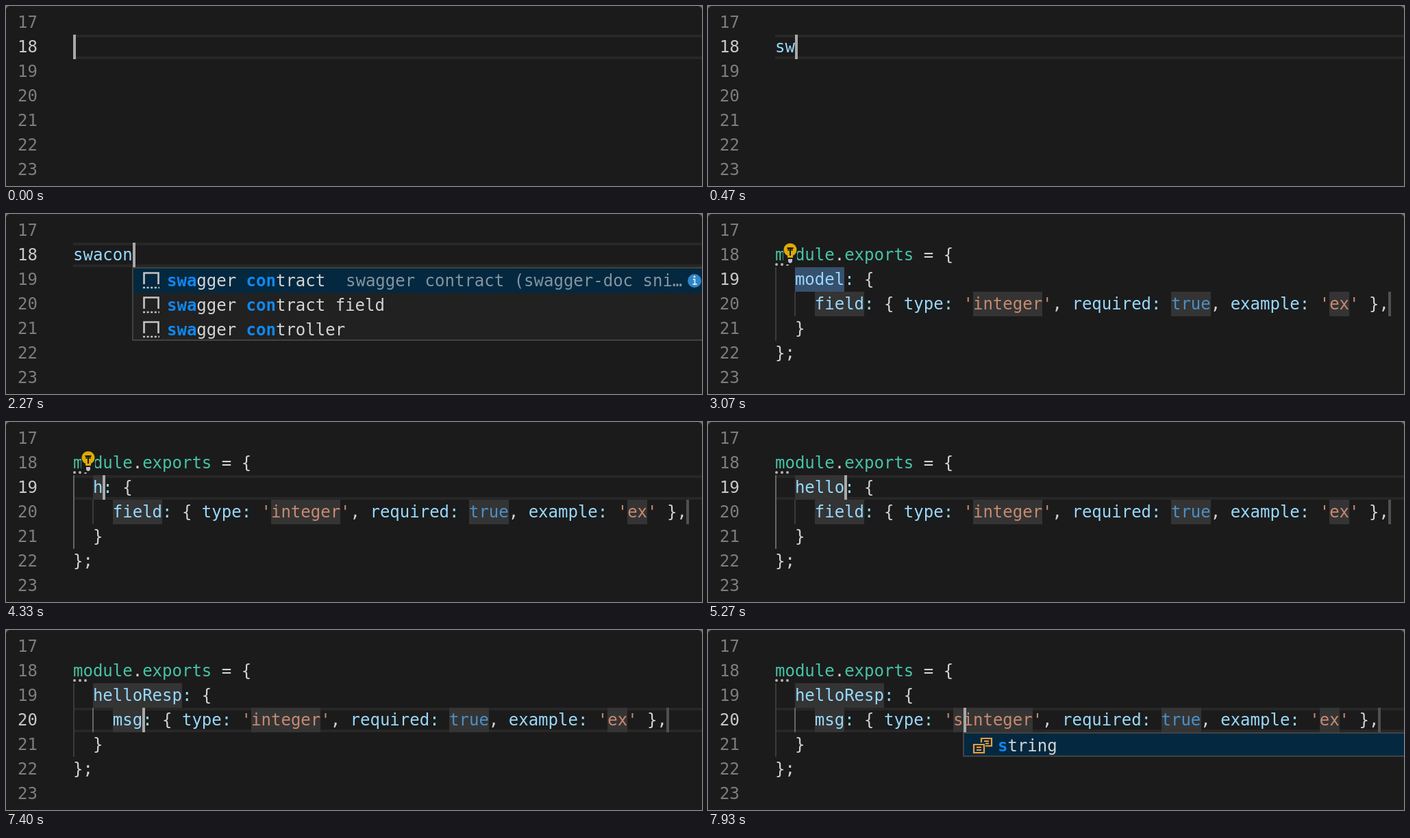
Write an HTML page that moves like this. It is 1016 px wide and 264 px high and loops after 8 s.

```html
<!DOCTYPE html>
<html lang="en">
<head>
<meta charset="utf-8">
<title>Snippet completion</title>
<style>
  html, body { margin: 0; width: 100%; height: 100%; overflow: hidden; background: #1b1b1b; }
  svg { display: block; width: 1016px; height: 264px; }
  text { font: 24px "DejaVu Sans Mono", monospace; white-space: pre; }
  .match { font-weight: bold; fill: #0f87f0; }
</style>
</head>
<body>
<svg id="stage" viewBox="0 0 1016 264"></svg>
<script>
const LOOP = 8000, LEFT = 98, CHAR = 14.449, LINE = 36, FIRST = 17;
const C = {
  bg: '#1b1b1b', text: '#d4d4d4', key: '#98d9fd', type: '#47c3a6', str: '#c8896f', bool: '#4b90c8',
  dim: '#7d7d7d', bright: '#c8c8c8', mark: '#343434', select: '#36506e', caret: '#a8a8a8',
  border: '#272727', guide: '#3b3b3b', activeGuide: '#666', popup: '#212121', popupEdge: '#424242',
  row: '#04283f', icon: '#c5c5c5'
};

// Keystrokes, in ms
const PREFIX = [270, 470, 600, 1870, 2070, 2200];
const MODEL = [4330, 4470, 4600, 4670, 5030, 5530, 5630, 5870, 6070];
const FIELD = [7000, 7130, 7270];
const EXPAND = 2530, TO_FIELD = 6400, TO_TYPE = 7530, TYPE_S = 7870;
const KEYS = [-370, ...PREFIX, EXPAND, ...MODEL, TO_FIELD, ...FIELD, TO_TYPE, TYPE_S];

const SNIPPETS = ['swagger contract', 'swagger contract field', 'swagger controller', 'swagger doc', 'ShadowRoot'];
const CHOICES = ['integer', 'string', 'boolean', 'number'];

const typed = (word, times, t) => word.slice(0, times.filter(k => k <= t).length);
const colX = col => LEFT + col * CHAR;
const rowY = row => 6 + (row - FIRST) * LINE;
const rect = (x, y, w, h, fill) => `<rect x="${x}" y="${y}" width="${w}" height="${h}" fill="${fill}"/>`;
const label = (x, y, content, fill) => `<text x="${x}" y="${y}" fill="${fill}">${content}</text>`;
const cell = (row, col, n, fill) => rect(Math.round(colX(col)), rowY(row), Math.round(n * CHAR), LINE, fill);
const caret = (row, col) => rect(Math.round(colX(col)), rowY(row), 4, LINE, C.caret);

// Each part is [text, colour, background]
function codeLine(row, col, parts) {
  let out = '';
  for (const [content, fill, back] of parts) {
    if (back) out += cell(row, col, content.length, back);
    out += label(colX(col), rowY(row) + 26, content, fill);
    col += content.length;
  }
  return { out, end: col };
}

function lineBorder(row) {
  const y = rowY(row);
  return rect(LEFT, y, 918, 4, C.border) + rect(LEFT, y + 32, 918, 4, C.border);
}

function bulb(row) {
  const y = rowY(row);
  return rect(110, y + 1, 20, 31, C.bg) +
    `<g transform="translate(120 ${y + 11})">
      <path d="M-4 11V8A9.5 9.5 0 1 1 4 8V11Z" fill="#dcaa08"/>
      <path d="M-4.5-3H4.5M0-3V8M-2.5-3V1M2.5-3V1" stroke="${C.bg}" stroke-width="2" fill="none"/>
      <path d="M-3 13H3V17L1 19H-1L-3 17Z" fill="#c0c0c0"/>
    </g>`;
}

const ICONS = {
  snippet: `<path d="M2.5 19V2.5H23.5V19" fill="none" stroke="${C.icon}" stroke-width="2.6"/>
    <path d="M1 24H25" stroke="${C.icon}" stroke-width="2.6" stroke-dasharray="3 2.6"/>`,
  variable: `<path d="M5 7H1V20H5M22 7H26V20H22" fill="none" stroke="${C.icon}" stroke-width="2.4"/>
    <path d="M6 12L15 7L21 10V15L12 20L6 17Z" fill="#75beff"/>
    <path d="M7 12L12.5 14.5L20.5 10.5" fill="none" stroke="${C.popup}" stroke-width="1.4"/>`,
  choice: `<g fill="${C.row}" stroke="#ee9d38" stroke-width="2.2">
    <path d="M12 9V3H27V14H18M1 12H16V24H1Z"/>
    <path d="M16 7H23M18 10.500H23M5 16H12M5 20H12"/></g>`
};

function highlight(word, prefix) {
  const hits = new Set(), lower = word.toLowerCase();
  let from = 0;
  for (const ch of prefix) {
    let i = lower.indexOf(ch, from);
    if (i < 0) i = lower.indexOf(ch);
    else from = i + 1;
    hits.add(i);
  }
  return [...word].map((ch, i) => hits.has(i) ? `<tspan class="match">${ch}</tspan>` : ch).join('');
}

function popup(row, col, items, prefix, iconOf, detail) {
  const x = Math.round(colX(col)), y = rowY(row + 1), h = items.length * LINE;
  let out = rect(x - 1, y, 860, h, C.popupEdge) + rect(x + 1, y + 2, 856, h - 4, C.popup) +
    rect(x + 1, y + 2, 856, Math.min(LINE, h - 4), C.row);
  items.forEach((item, i) => {
    const top = y + i * LINE;
    out += `<g transform="translate(${x + 14} ${top + 6})">${ICONS[iconOf(item)]}</g>` +
      label(x + 50, top + 28, highlight(item, prefix), C.text);
  });
  if (detail) {
    out += label(x + 311, y + 28, detail, '#8494a0') +
      `<circle cx="${x + 820}" cy="${y + 20}" r="10" fill="#2f86c6"/>` +
      `<path d="M${x + 818} ${y + 18}h2.500v7m-3 0h6" stroke="#d2e6f4" stroke-width="1.8" fill="none"/>` +
      `<circle cx="${x + 820}" cy="${y + 14}" r="1.600" fill="#d2e6f4"/>`;
  }
  return out;
}

function prefixScene(t, blink) {
  const word = typed('swacon', PREFIX, t), n = word.length;
  let out = lineBorder(18) + codeLine(18, 0, [[word, C.key]]).out;
  if (t >= 530) {
    // A longer list runs past the bottom edge until the fourth letter
    const items = n < 4 ? [...SNIPPETS, ' '] : SNIPPETS.slice(0, n < 5 ? 5 : 3);
    out += popup(18, n, items, word,
      item => item === 'ShadowRoot' ? 'variable' : 'snippet',
      'swagger contract (swagger-doc sni…');
  }
  return out + (blink ? caret(18, n) : '');
}

function codeScene(t, blink) {
  const inField = t >= TO_FIELD, inType = t >= TO_TYPE, hasS = t >= TYPE_S;
  const model = typed('helloResp', MODEL, t) || 'model';
  const field = typed('msg', FIELD, t) || 'field';
  const modelSelected = t < MODEL[0], fieldSelected = inField && t < FIELD[0];
  const type = (hasS ? 's' : '') + 'integer';
  const row = inField ? 20 : 19;
  let out = modelSelected || fieldSelected ? '' : lineBorder(row);

  out += codeLine(18, 0, [['module', C.type], ['.', C.text], ['exports', C.type], [' = {', C.text]]).out;
  out += codeLine(19, 2, [
    [model, C.key, modelSelected ? C.select : C.mark], [':', C.key], [' {', C.text]]).out;
  const body = codeLine(20, 4, [
    [field, C.key, fieldSelected ? C.select : C.mark], [':', C.key], [' { ', C.text],
    ['type:', C.key], [" '", C.str], [type, C.str, C.mark], ["'", C.str], [', ', C.text],
    ['required:', C.key], [' ', C.text], ['true', C.bool, C.mark], [', ', C.text],
    ['example:', C.key], [" '", C.str], ['ex', C.str, C.mark], ["'", C.str], [' },', C.text]]);
  out += body.out + rect(Math.round(colX(body.end)) - 1, rowY(20), 4, LINE, '#505050');
  out += codeLine(21, 2, [['}', C.text]]).out + codeLine(22, 0, [['};', C.text]]).out;

  out += rect(LEFT, rowY(19), 2, 108, !modelSelected && !inField ? C.activeGuide : C.guide);
  out += rect(126, rowY(20), 2, LINE, t >= FIELD[0] ? C.activeGuide : C.guide);
  if (t >= 2870) out += [100, 108, 116].map(x => `<circle cx="${x}" cy="74" r="2" fill="#b5b5b5"/>`).join('');
  if (t >= 2800 && t < 5030) out += bulb(18);
  if (t >= 6670 && t < 7330) out += bulb(20);

  const choiceCol = 4 + field.length + 9 + 2 + (hasS ? 1 : 0) - 0;
  const col = inType ? choiceCol : inField ? 4 + field.length : 2 + model.length;
  if (t >= TO_TYPE + 70) {
    out += popup(20, choiceCol, hasS ? ['string'] : CHOICES, hasS ? 's' : '', () => 'choice');
  }
  return out + (blink ? caret(row, col) : '');
}

function picture(t) {
  const lastKey = KEYS.filter(k => k <= t).pop();
  const blink = Math.floor((t - lastKey) / 500) % 2 === 0;
  const active = t < EXPAND ? 18 : t < TO_FIELD ? 19 : 20;
  let out = rect(0, 0, 1016, 264, C.bg);
  for (let row = FIRST; row <= 23; row++) {
    out += label(17, rowY(row) + 26, row, row === active ? C.bright : C.dim);
  }
  out += t < EXPAND ? prefixScene(t, blink) : codeScene(t, blink);
  return out + '<path d="M0 0H5Q1 1 0 5ZM1016 0H1011Q1015 1 1016 5Z" fill="#666"/>';
}

const stage = document.getElementById('stage');
const start = performance.now();
let shown = '';

function draw() {
  const next = picture((performance.now() - start) % LOOP);
  if (next !== shown) stage.innerHTML = shown = next;
  requestAnimationFrame(draw);
}
draw();
</script>
</body>
</html>
```
